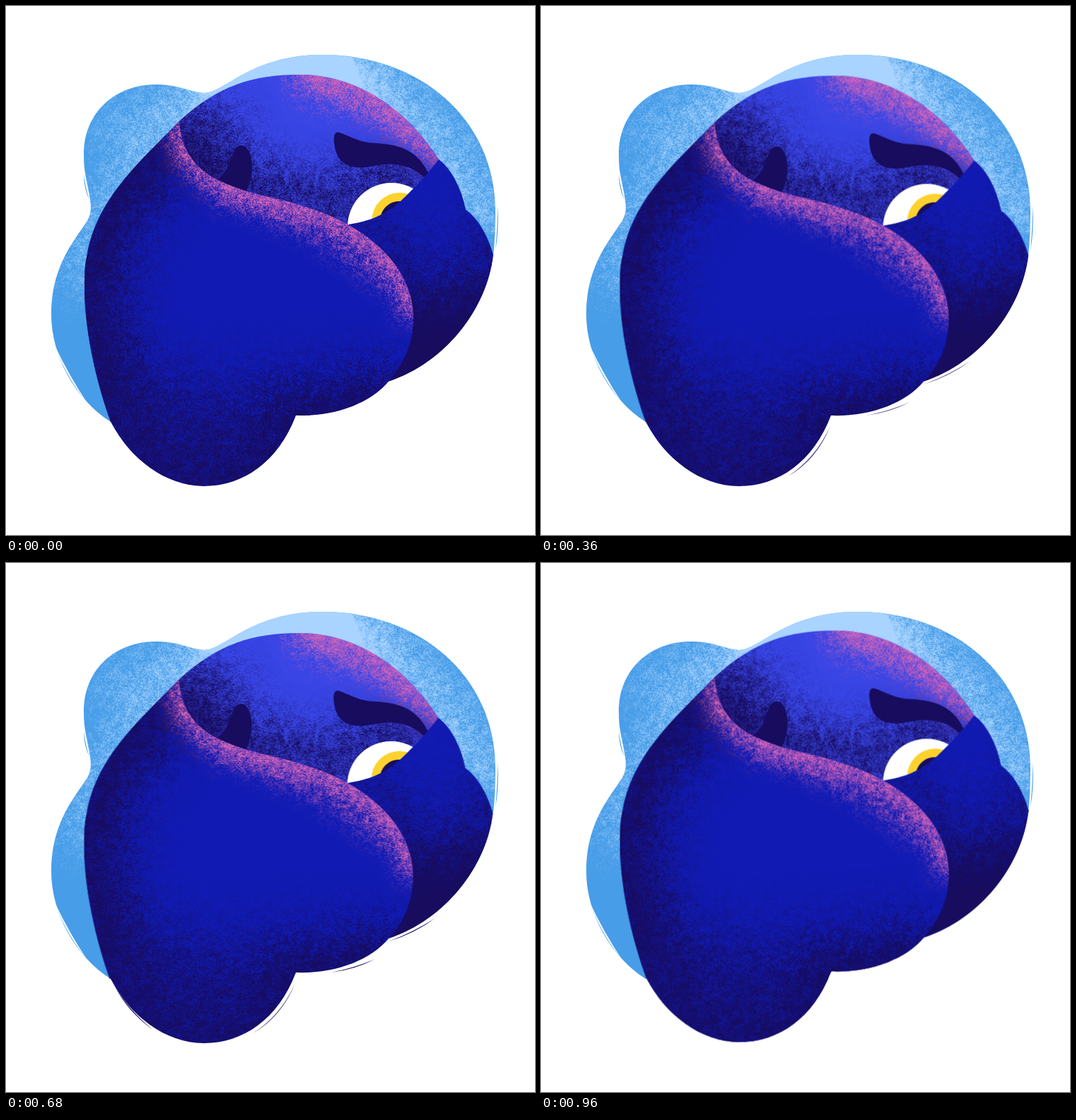
An HTML page with a canvas for the animation above (1000 ms loop, 748 by 748 pixels).

```html
<!DOCTYPE html>
<html>
<head>
<meta charset="utf-8">
<style>
html, body { margin: 0; width: 100%; height: 100%; overflow: hidden; background: #fff; }
canvas { display: block; width: 748px; height: 748px; }
</style>
</head>
<body>
<canvas id="stage" width="748" height="748"></canvas>
<script>
const S = 748, NAVY = '#170c5e', BLUE = '#111bb3', SKY = '#479de8', PALE = '#a9d4ff', PINK = '#d565b8';
const stage = document.getElementById('stage').getContext('2d');

function layer() {
  const c = document.createElement('canvas');
  c.width = c.height = S;
  return c.getContext('2d', { willReadFrequently: true });
}

// Seeded grain: fine specks mixed with soft clumps
let seed = 7;
const rand = () => (seed = (seed * 1664525 + 1013904223) >>> 0) / 4294967296;
const lattice = Float32Array.from({ length: S * S }, rand);
function smooth(x, y, size) {
  x /= size; y /= size;
  const i = x | 0, j = y | 0, u = x - i, v = y - j, p = j * S + i;
  const top = lattice[p] * (1 - u) + lattice[p + 1] * u;
  const low = lattice[p + S] * (1 - u) + lattice[p + S + 1] * u;
  return top * (1 - v) + low * v;
}
const noise = new Float32Array(S * S);
for (let y = 0; y < S; y++)
  for (let x = 0; x < S; x++)
    noise[y * S + x] = 0.7 * smooth(x, y, 1.25) + 0.3 * smooth(x, y, 6) - 0.5;

const fill = (g, d, color) => { g.fillStyle = color; g.fill(new Path2D(d)); };

// Blurred marks [path, line width (0 = filled), alpha] roughened by the grain, inside a shape
function grain(g, shape, color, blur, marks) {
  const m = layer();
  m.filter = `blur(${blur}px)`;
  m.fillStyle = m.strokeStyle = color;
  m.lineJoin = 'round';
  for (const [d, width, alpha] of marks) {
    m.globalAlpha = alpha;
    m.lineWidth = width;
    width ? m.stroke(new Path2D(d)) : m.fill(new Path2D(d));
  }
  const img = m.getImageData(0, 0, S, S), px = img.data;
  const [r, gr, b] = [1, 3, 5].map(i => parseInt(color.slice(i, i + 2), 16));
  for (let i = 0; i < noise.length; i++) {
    const a = px[i * 4 + 3] / 255;
    px[i * 4] = r; px[i * 4 + 1] = gr; px[i * 4 + 2] = b;
    px[i * 4 + 3] = 255 * Math.max(0, Math.min(1, a * 1.05 + noise[i] * 3 * Math.sqrt(a * (1 - a))));
  }
  m.putImageData(img, 0, 0);
  g.save();
  g.clip(new Path2D(shape));
  g.drawImage(m.canvas, 0, 0);
  g.restore();
}

function crescent(g, x0, y0, cx, cy, x1, y1, dx, dy, color) {
  fill(g, `M${x0} ${y0}Q${cx} ${cy} ${x1} ${y1}Q${cx + dx} ${cy + dy} ${x0} ${y0}Z`, color);
}

function circle(g, x, y, r, color) {
  g.fillStyle = color;
  g.beginPath();
  g.arc(x, y, r, 0, 7);
  g.fill();
}

// Outlines
const crown = 'M245 163C300 112 350 97 415 97C500 97 570 150 612 217';
const head = crown + 'L560 330L450 320L302 260L240 250Z';
const handLow = 'C680 430 620 505 541 531';
const hand = 'M612 217C632 232 645 262 650 288C670 302 683 330 689 352' + handLow +
  'L500 500L484 309C530 302 550 285 572 262C585 250 600 232 612 217Z';
const fold = 'M245 163C247 200 265 230 302 247C345 268 385 270 430 286C520 315 576 375 576 440';
const dip = 'C515 562 465 581 410 579';
const lobe = 'C385 645 335 679 280 679C225 679 175 640 148 588';
const side = 'C120 510 111 440 111 400C111 370 112 365 115 350C130 270 190 220 245 163';
const trunk = fold + 'C576 480 562 505 541 531' + dip + lobe + side + 'Z';
const blob = 'M148 588C98 556 64 495 64 436C64 375 90 340 108 314C120 298 122 290 118 268' +
  'C114 245 110 235 110 210C110 150 155 111 212 111C245 111 260 122 280 123' +
  'C310 123 345 69 448 69C585 69 692 160 692 290C692 315 691 335 689 352L400 450Z';

function paintBack() {
  const g = layer();
  fill(g, blob, SKY);
  grain(g, blob, PALE, 24, [
    ['M255 170L290 60H505L545 170Z', 0, 1],
    ['M112 400C118 350 135 270 190 220L245 163L285 125', 46, 0.42],
    ['M480 100Q570 145 625 225L680 330', 80, 0.5],
    ['M140 195L250 135', 70, 0.3]
  ]);
  fill(g, 'M280 123C310 123 345 69 448 69Q475 69 490 73L505 112L300 132Z', PALE);
  crescent(g, 70, 482, 84.5, 523.7, 114, 560, 4, -2.3, '#fff');
  crescent(g, 110, 238, 110, 258, 118, 274, 2.4, 0, SKY);
  crescent(g, 695.5, 282, 697, 320, 692, 346, -2.4, 0, SKY);
  return g.canvas;
}

function paintBody() {
  const g = layer();
  fill(g, head, '#3845e5');
  grain(g, head, NAVY, 26, [
    ['M243 160C247 200 265 230 302 247L335 262', 66, 0.95],
    ['M258 150L310 225', 100, 0.45],
    ['M320 258C350 268 385 270 430 286L500 312', 90, 0.6],
    ['M470 262Q530 245 610 238', 60, 0.65]
  ]);
  grain(g, head, PINK, 15, [
    ['M405 92C500 94 570 148 616 217', 40, 0.72],
    ['M420 112Q520 130 585 185', 44, 0.25]
  ]);
  fill(g, 'M332 197C322 199 322 210 315 225C310 237 304 240 298 247C312 257 325 263 338 265' +
    'C350 245 349 225 346 212C343 203 338 196 332 197Z', NAVY);
  fill(g, 'M470 178.5C485 183 495 191 515 193.5C550 195 580 200 597 236C598 242 596 245 592 243' +
    'C570 222 545 221 520 226C495 232 470 228 465 200C462 185 464 178 470 178.5Z', NAVY);
  circle(g, 545, 312, 62, '#fff');
  circle(g, 557, 304, 40, '#fdd22e');
  circle(g, 556, 303, 27, NAVY);

  fill(g, hand, BLUE);
  grain(g, hand, NAVY, 34, [
    ['M500 390L570 405L625 400L720 320V600H480Z', 0, 1],
    ['M484 309C530 325 576 385 576 440', 70, 0.5],
    ['M655 285L692 352', 40, 0.45]
  ]);

  fill(g, trunk, BLUE);
  grain(g, trunk, NAVY, 36, [
    ['M148 588' + side, 104, 0.9],
    ['M410 579' + lobe, 90, 0.65],
    ['M120 500L300 530L560 505V720H120Z', 0, 0.45]
  ]);
  grain(g, trunk, NAVY, 22, [['M545 531' + dip + 'L385 600', 60, 0.8]]);
  grain(g, trunk, PINK, 13, [
    [fold, 30, 0.78],
    ['M300 255Q440 285 555 385', 50, 0.27]
  ]);
  return g.canvas;
}

const back = paintBack(), body = paintBody();

// The lower edge stays put while the body shivers behind it
const frame = new Path2D('M0 0H748V352H689.5' + handLow + dip + lobe + 'H0Z');

// Slivers that peek out below: direction, then crescent
const slivers = [
  [0, 0.9, 541, 535, 578, 524, 607, 502, -1, -2.2],
  [0, 0.9, 460, 579, 493, 575, 522, 560, -1, -2.2],
  [0.55, 0.8, 349, 665, 390, 642, 409, 594, -2, -2],
  [-0.8, 0.6, 153, 597, 172, 635, 208, 660, 2, -2]
];

// Shiver: step, x, y
const keys = [[0, 0, 0], [3, 1, 0.5], [7, 1, 2.2], [12, -0.4, 0.2], [17, -0.5, 2], [20, 1, -0.9], [24, 0.6, -1.5], [25, 0, 0]];
function shiver(step) {
  const i = keys.findIndex(k => k[0] > step), a = keys[i - 1], b = keys[i];
  const u = (step - a[0]) / (b[0] - a[0]), e = u * u * (3 - 2 * u);
  return [a[1] + (b[1] - a[1]) * e, a[2] + (b[2] - a[2]) * e];
}

function draw(now) {
  const [x, y] = shiver(Math.floor(now % 1000 / 40));
  stage.fillStyle = '#fff';
  stage.fillRect(0, 0, S, S);
  stage.drawImage(back, 0, 0);
  stage.save();
  stage.clip(frame);
  stage.drawImage(body, x, y);
  stage.restore();
  for (const [nx, ny, ...shape] of slivers) {
    stage.globalAlpha = Math.max(0, Math.min(1, x * nx + y * ny - 0.7));
    crescent(stage, ...shape, NAVY);
  }
  stage.globalAlpha = 1;
  requestAnimationFrame(draw);
}
requestAnimationFrame(draw);
</script>
</body>
</html>
```
